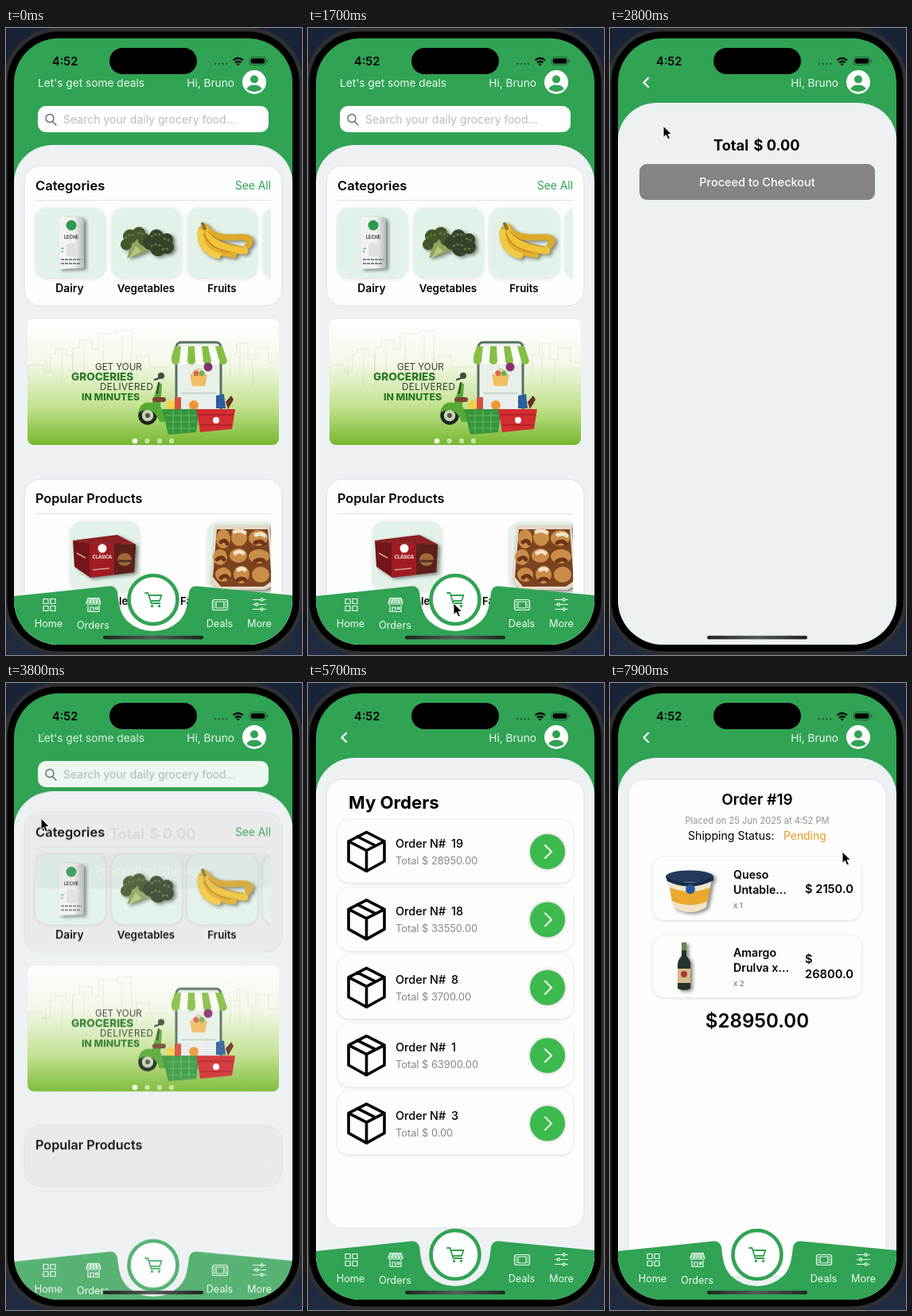
Recreate the animation shown at these times as an HTML page. Size 372 by 788 pixels, loop 8 s.

```html
<!DOCTYPE html>
<html lang="en">
<head>
<meta charset="utf-8">
<title>Grocery app</title>
<style>
html, body { margin: 0; width: 100%; height: 100%; overflow: hidden; background: #1b2438; }
svg { display: block; width: 372px; height: 788px; font-family: Inter, Roboto, sans-serif; }
text { white-space: pre; }
.mid { text-anchor: middle; }
.end { text-anchor: end; }
.w5 { font-weight: 500; }
.w6 { font-weight: 600; }
.w7 { font-weight: 700; }
.w8 { font-weight: 800; }
.line { fill: none; stroke-linecap: round; stroke-linejoin: round; }
.card { fill: #fdfdfd; stroke: #dadfe2; }
.tile { fill: #e2f2e9; filter: drop-shadow(0 1px 2px #0002); }
.row { fill: #fdfdfd; filter: drop-shadow(0 1px 2px #0002); }
.photo { filter: drop-shadow(3px 2px 2px #0007); }
.label { font-size: 12.7px; fill: #eefaf1; text-anchor: middle; }

.move { animation: 8s ease-in-out infinite; }
.panel { animation-name: panel; }
.home { animation-name: home; }
.home .card { animation: tint 8s ease-in-out infinite; }
.cart { animation-name: cart; }
.orders { animation-name: orders; }
.detail { animation-name: detail; }
.back { animation-name: back; }
.nav { animation-name: nav; }
.loaded { animation: loaded 8s step-end infinite; }
.home .loading { animation: loading 8s step-end infinite, tint 8s ease-in-out infinite; }
.press-cart { animation: pressCart 8s linear infinite; }
.press-orders { animation: pressOrders 8s linear infinite; }
.pointer { animation: point 8s ease-in-out infinite, seen 8s step-end infinite; }

@keyframes panel {
  0%, 23.125% { transform: none; }
  27.5%, 44.5% { transform: translateY(-53px); }
  48.875%, 63.5% { transform: none; }
  67.875%, 100% { transform: translateY(-53px); }
}
@keyframes home {
  0%, 23.125% { opacity: 1; }
  27.5%, 44.5% { opacity: 0; }
  48.3%, 63.5% { opacity: 1; }
  67.875%, 100% { opacity: 0; }
}
@keyframes tint {
  0%, 23.125% { fill: #fdfdfd; }
  27.5%, 44.5% { fill: #a0a0a0; }
  48.875%, 63.5% { fill: #fdfdfd; }
  67.875%, 100% { fill: #a0a0a0; }
}
@keyframes cart {
  0%, 23.125% { opacity: 0; }
  27.5%, 44.5% { opacity: 1; }
  48.2%, 100% { opacity: 0; }
}
@keyframes orders {
  0%, 63.5% { opacity: 0; }
  67.875%, 83.75% { opacity: 1; }
  88.125%, 100% { opacity: 0; }
}
@keyframes detail {
  0%, 83.75% { opacity: 0; }
  88.125%, 100% { opacity: 1; }
}
@keyframes back {
  0%, 23.125% { opacity: 0; }
  27.5%, 44.5% { opacity: 1; }
  48.875%, 63.5% { opacity: 0; }
  67.875%, 100% { opacity: 1; }
}
@keyframes nav {
  0%, 23.125% { transform: none; opacity: 1; }
  27.5%, 44.5% { transform: translateY(65px); opacity: 0; }
  48.875%, 100% { transform: none; opacity: 1; }
}
@keyframes loaded { 0% { opacity: 1; } 44.5% { opacity: 0; } 50.6%, 100% { opacity: 1; } }
@keyframes loading { 0% { opacity: 0; } 44.5% { opacity: 1; } 50.6%, 100% { opacity: 0; } }
@keyframes pressCart { 0%, 22% { opacity: 1; } 22.5%, 23.5% { opacity: .3; } 25%, 100% { opacity: 1; } }
@keyframes pressOrders { 0%, 61.2% { opacity: 1; } 61.8%, 63.5% { opacity: .25; } 66%, 100% { opacity: 1; } }
@keyframes point {
  0%, 17.5% { transform: translate(205px, 650px); }
  20%, 26% { transform: translate(183px, 723px); }
  35% { transform: translate(67px, 123px); }
  40%, 44.3% { transform: translate(45px, 70px); }
  47.5% { transform: translate(44px, 170px); }
  56%, 66% { transform: translate(118px, 732px); }
  77.5% { transform: translate(250px, 400px); }
  81.5%, 85% { transform: translate(300px, 214px); }
  92%, 100% { transform: translate(292px, 212px); }
}
@keyframes seen {
  0% { opacity: 0; }
  17.5% { opacity: 1; }
  66% { opacity: 0; }
  77.5%, 100% { opacity: 1; }
}
</style>
</head>
<body>
<svg viewBox="0 0 372 788">
  <defs>
    <clipPath id="screen"><rect x="10" y="13" width="350" height="762" rx="56"/></clipPath>
    <clipPath id="inner"><rect x="30" y="215" width="303" height="560"/></clipPath>
    <clipPath id="ad"><rect x="27" y="366" width="316" height="158" rx="8"/></clipPath>
    <linearGradient id="desk" x2="0" y2="1">
      <stop offset="0" stop-color="#1a2439"/><stop offset=".5" stop-color="#10151f"/><stop offset="1" stop-color="#202b42"/>
    </linearGradient>
    <linearGradient id="lawn" x2="0" y2="1">
      <stop offset="0" stop-color="#fff"/><stop offset=".35" stop-color="#f3f8e9"/>
      <stop offset=".7" stop-color="#c2e18d"/><stop offset="1" stop-color="#76b82e"/>
    </linearGradient>
    <linearGradient id="side"><stop offset=".6" stop-color="#f2f3f1"/><stop offset="1" stop-color="#b4b9b7"/></linearGradient>
    <linearGradient id="bar"><stop stop-color="#222"/><stop offset=".5" stop-color="#555c5a"/><stop offset="1" stop-color="#222"/></linearGradient>
    <g id="parcel" class="line" stroke="#000" stroke-width="3.6">
      <path d="M0-24.500 22.500-13V12L0 24.500-22.500 12V-13ZM-22.500-13 0-1.500 22.500-13M0-1.500V24.500M-11.500-19 11.500-7.500"/>
    </g>
  </defs>

  <rect width="372" height="788" fill="url(#desk)"/>
  <rect x="-1" y="2" width="372" height="784" rx="67" fill="#000" stroke="#2d2f32" stroke-width="5"/>

  <g clip-path="url(#screen)">
    <rect x="10" y="13" width="350" height="762" fill="#31a354"/>

    <g class="move panel">
      <rect x="10" y="147" width="350" height="760" rx="49" ry="47" fill="#edf1f4"/>

      <g class="move home">
        <rect class="card" x="23" y="173" width="324" height="176" rx="20"/>
        <text class="w6" x="37" y="204" font-size="16.500">Categories</text>
        <text class="end" x="333" y="203" font-size="13.800" fill="#31a354">See All</text>
        <path d="M37 216.500H333" stroke="#dfe2e4"/>
        <g clip-path="url(#inner)">
          <rect class="tile" x="37" y="226" width="88" height="88" rx="15"/>
          <rect class="tile" x="133" y="226" width="88" height="88" rx="15"/>
          <rect class="tile" x="228" y="226" width="88" height="88" rx="15"/>
          <rect class="tile" x="323" y="226" width="88" height="88" rx="15"/>
        </g>
        <g class="photo">
          <path d="M66 241 69 237 96 238 98 242V302L67 303Z" fill="url(#side)"/>
          <circle cx="82" cy="248" r="6.500" fill="#2c9a4d"/>
          <path d="M76 272q6-4 12 0v14q-6 3-12 0Z" fill="#dce1df"/>
          <path d="M69 277h4M69 281h3" stroke="#7fae8a" stroke-width="1.500"/>
          <path d="M69 291h26M69 296h24" stroke="#7d868c" stroke-width="1.800" stroke-dasharray="4 1"/>
          <text class="mid w7" x="82" y="265" font-size="5.500" fill="#333">LECHE</text>
        </g>
        <g class="photo">
          <path d="M152 289 158 271 172 264 181 279 164 286Z" fill="#91a45a"/>
          <path d="M155 289 163 274 170 281Z" fill="#b5c582"/>
          <g fill="#45562b">
            <circle cx="151" cy="272" r="7"/><circle cx="156" cy="262" r="9"/><circle cx="167" cy="258" r="8"/><circle cx="174" cy="266" r="8"/>
          </g>
          <g fill="#34432a">
            <circle cx="181" cy="270" r="9"/><circle cx="189" cy="262" r="9"/><circle cx="202" cy="266" r="8"/><circle cx="191" cy="277" r="10"/><circle cx="202" cy="275" r="9"/>
          </g>
          <path class="line" d="M150 264q6-6 12-3M166 258q6-1 8 4M183 262q8-6 12 0M199 265q6 0 7 5M183 274q8-5 13 2M197 278q5-2 7 1" stroke="#64783f" stroke-width="2.500" stroke-dasharray="1 4"/>
        </g>
        <g class="photo line">
          <path d="M251 250Q260 265 287 263T304 273" stroke="#dda92a" stroke-width="8"/>
          <path d="M249 251Q254 275 300 280" stroke="#f1c338" stroke-width="9"/>
          <path d="M246 253Q248 281 286 285" stroke="#e3ae2d" stroke-width="8"/>
          <path d="M244 257Q244 280 266 286" stroke="#f3ca45" stroke-width="8"/>
          <path d="M254 256Q266 271 298 275M249 259Q256 278 282 282" stroke="#b98521" stroke-width="1.200"/>
          <path d="M247 246l3 6" stroke="#8a7430" stroke-width="4"/>
        </g>
        <g class="mid w6" font-size="13.300">
          <text x="80" y="332" font-size="13.800">Dairy</text><text x="176" y="332">Vegetables</text><text x="271.500" y="332">Fruits</text>
        </g>

        <g clip-path="url(#ad)">
          <rect x="27" y="366" width="316" height="158" fill="url(#lawn)"/>
          <path class="line" d="M28 440V424H46V432H56V410H62V404H76V412H84V450M84 430V402H92V392H108V404H116V384H140V380H158V450M122 390V445M146 386V445M164 440V412H180V426H204M282 440V410H290V396H304V416H314V402H330V420H342M50 440V416M70 410V450M98 398V440M294 402V450M310 418V450" stroke="#94a39a" opacity=".2"/>
          <g fill="#333c33" font-size="11.600">
            <text x="112" y="430">GET YOUR</text>
            <text x="118" y="455" letter-spacing=".5">DELIVERED</text>
          </g>
          <g class="w8" fill="#287a22">
            <text x="82" y="443" font-size="13.600">GROCERIES</text>
            <text x="95" y="468" font-size="12.300">IN MINUTES</text>
          </g>
          <rect x="214" y="395" width="56" height="94" rx="6" fill="#e9f0ea" stroke="#587064" stroke-width="3"/>
          <path d="M212 400H272L278 413V418a5 5 0 0 1-10 0a5 5 0 0 1-10 0a5 5 0 0 1-10 0a5 5 0 0 1-10 0a5 5 0 0 1-10 0a5 5 0 0 1-10 0a5 5 0 0 1-10 0V413Z" fill="#fbfcf5"/>
          <path d="M212 400h8l-2 18a5 5 0 0 1-10 0v-5ZM229 400h8l1 18a5 5 0 0 1-10 0ZM246 400h8l4 18a5 5 0 0 1-10 0ZM263 400h9l6 18a5 5 0 0 1-10 0Z" fill="#86bf45"/>
          <circle cx="254" cy="426" r="5.500" fill="#86316d"/>
          <path d="M231 436h22l-3 14h-16Z" fill="#f0bd61"/>
          <path class="line" d="M233 436q9-15 18 0" stroke="#d8a14e"/>
          <circle cx="239" cy="434" r="3.500" fill="#e2644d"/><circle cx="246" cy="434" r="3.500" fill="#74b34e"/>
          <path class="line" d="M221 459h42" stroke="#c7d4ca" stroke-width="2"/>
          <circle cx="178" cy="487" r="9.500" fill="#c7d3b5" stroke="#20271e" stroke-width="4.500"/>
          <circle cx="178" cy="487" r="3" fill="#4b5547"/>
          <path d="M166 484Q169 468 184 471L191 446 196 447 194 475Q199 490 213 482L216 495H193Q184 472 166 484Z" fill="#55a934"/>
          <path class="line" d="M187 442l11-4M192 446l-2 13" stroke="#33402f" stroke-width="2"/>
          <circle cx="195" cy="437" r="4" fill="#424c3f"/>
          <rect x="184" y="464" width="17" height="6" rx="3" fill="#79462d"/>
          <circle cx="207" cy="474" r="6" fill="#f2d14b"/><rect x="212" y="464" width="8" height="18" fill="#d84e40"/>
          <rect x="222" y="467" width="9" height="16" fill="#e7e9eb"/><circle cx="236" cy="474" r="6" fill="#ef9735"/>
          <path d="M248 466l8-4 6 18h-12Z" fill="#e9edf0"/><path d="M264 462l10-2 2 18h-12Z" fill="#2f5e9e"/><path d="M276 470l7-8 3 5-7 12Z" fill="#6e2d26"/>
          <path d="M196 479H243L239 508 204 511Z" fill="#36963d"/>
          <path d="M201 487h38M203 495h35M204 503h34M210 481v28M220 481v27M230 481v27" stroke="#62b95c" stroke-width="1.200"/>
          <path d="M239 479H288L284 504 244 508Z" fill="#d32d31"/>
          <path d="M242 486h44M244 499h40" stroke="#a91f26" stroke-width="1.500"/>
          <circle cx="264" cy="493" r="4" fill="#fff"/>
          <g fill="#fff"><circle cx="162" cy="519" r="3.300"/><g opacity=".55"><circle cx="177.500" cy="519" r="3.200"/><circle cx="193" cy="519" r="3.200"/><circle cx="208" cy="519" r="3.200"/></g></g>
        </g>

        <rect class="card loading" x="23" y="567" width="324" height="76" rx="20"/>
        <g class="loaded">
          <rect class="card" x="23" y="567" width="324" height="240" rx="20"/>
          <g clip-path="url(#inner)">
            <rect class="tile" x="81" y="620" width="87" height="87" rx="15"/>
            <rect class="tile" x="253" y="620" width="87" height="87" rx="15"/>
            <g class="photo">
              <path d="M84 644 140 637 163 649 105 647Z" fill="#8e2024"/>
              <path d="M84 644 105 647V690L86 677Z" fill="#74151a"/>
              <path d="M105 647 163 649 161 684 105 691Z" fill="#a01c22"/>
              <path d="M136 648 163 649 161 684 136 687Z" fill="#5c201b"/>
              <circle cx="121" cy="654" r="5.500" fill="#fff"/>
              <text class="mid w7" x="121" y="667" font-size="5.500" fill="#fff">CLÁSICA</text>
              <ellipse cx="149" cy="668" rx="9" ry="8" fill="#a2683a"/>
              <path d="M141 670h17" stroke="#55331d" stroke-width="3"/>
              <path d="M109 681 130 679M89 660l11 6" stroke="#d6a293" stroke-width="1.500"/>
            </g>
            <g class="photo">
              <path d="M262 625H331L338 700 326 706H268L256 694Z" fill="#e4d8c8"/>
              <path d="M265 630H329L334 695 324 702H270L260 690Z" fill="#7b431f"/>
              <g fill="#c98d48">
                <ellipse cx="273" cy="642" rx="9" ry="12"/><ellipse cx="293" cy="640" rx="10" ry="11"/><ellipse cx="317" cy="641" rx="12" ry="10"/>
                <ellipse cx="269" cy="665" rx="9" ry="10"/><ellipse cx="292" cy="663" rx="11" ry="9"/><ellipse cx="318" cy="664" rx="13" ry="9"/>
                <ellipse cx="273" cy="687" rx="10" ry="9"/><ellipse cx="296" cy="687" rx="10" ry="11"/><ellipse cx="320" cy="687" rx="11" ry="10"/>
              </g>
              <path class="line" d="M270 646q6-4 8 2M313 647q7-4 11 1M265 668q6-5 9 0M313 670q8-4 11 0M270 691q6-5 9 0M291 694q6-4 10 0" stroke="#6d3515" stroke-width="5"/>
              <path class="line" d="M287 633q7-3 13 1M288 660q5-4 10 0M314 637q7-3 11 1M292 681q5-3 8 0" stroke="#f3e4cb" stroke-width="5"/>
            </g>
          </g>
          <g class="w6" font-size="13.200"><text x="142" y="725">le</text><text x="219" y="725">Fa</text></g>
        </g>
        <text class="w6" x="37" y="597" font-size="16.200">Popular Products</text>
        <path d="M37 610.500H333" stroke="#dfe2e4"/>
      </g>

      <g transform="translate(0 53)">
        <g class="move cart">
          <g class="w7" font-size="18.200"><text x="130" y="154">Total</text><text x="180.500" y="154">$ 0.00</text></g>
          <rect x="37" y="171" width="296" height="45" rx="9" fill="#848387"/>
          <text class="mid w5" x="185" y="199" font-size="14.500" fill="#fff">Proceed to Checkout</text>
        </g>
        <g class="move orders">
          <rect class="card" x="23" y="121" width="324" height="564" rx="20"/>
          <text class="w7" x="51" y="158" font-size="22.200">My Orders</text>
          <g id="list"></g>
        </g>
        <g class="move detail">
          <rect class="card" x="23" y="121" width="324" height="625" rx="20"/>
          <text class="mid w6" x="185" y="153" font-size="19">Order #19</text>
          <text class="mid" x="185" y="177" font-size="11.100" fill="#929296">Placed on 25 Jun 2025 at 4:52 PM</text>
          <text x="98" y="197" font-size="14.100">Shipping Status:</text>
          <text x="218" y="197" font-size="13.900" fill="#ee9723">Pending</text>
          <rect class="row" x="54" y="219" width="262" height="79" rx="15"/>
          <rect class="row" x="54" y="317" width="262" height="78" rx="15"/>
          <g class="photo">
            <path d="M73 246H128L121 282Q101 294 80 282Z" fill="#f1e5c7"/>
            <path d="M75 257Q101 267 126 257L123 274Q101 284 78 274Z" fill="#e9a92f"/>
            <ellipse cx="100" cy="243" rx="30" ry="7.500" fill="#23395e"/>
            <path d="M70 243Q101 259 130 243V248Q101 263 72 249Z" fill="#182b4b"/>
            <circle cx="101" cy="259" r="6" fill="#2759a5"/>
          </g>
          <g class="photo">
            <path d="M90 328H96V343Q102 349 101 355V384Q93 388 85 384V355Q85 348 90 343Z" fill="#263329"/>
            <path d="M90 326h6v10h-6Z" fill="#62874b"/>
            <path d="M85 359h16v18H85Z" fill="#d6bb8a"/>
            <circle cx="93" cy="366" r="4" fill="#ad3430"/>
          </g>
          <g class="w6" font-size="14.200">
            <text x="155" y="246">Queso</text><text x="155" y="265">Untable...</text>
            <text x="155" y="344">Amargo</text><text x="155" y="363">Drulva x...</text>
          </g>
          <g class="w6" font-size="14.700">
            <text x="245" y="264">$ 2150.0</text><text x="245" y="352">$</text><text x="245" y="371">26800.0</text>
          </g>
          <g class="w6" font-size="9.500" fill="#8c8c90"><text x="155" y="283">x 1</text><text x="155" y="381">x 2</text></g>
          <text class="mid w6" x="185" y="433" font-size="24.100">$28950.00</text>
        </g>
      </g>
    </g>

    <g class="move home">
      <text x="40" y="74" font-size="13.700" fill="#e9f8ee">Let's get some deals</text>
      <rect x="40" y="98" width="290" height="33" rx="10" fill="#fff"/>
      <path class="line" d="M59 118 63 122M60 113.500a5 5 0 1 1-10 0a5 5 0 1 1 10 0" stroke="#606064" stroke-width="1.300"/>
      <text x="72" y="120" font-size="14" fill="#bcbcc0">Search your daily grocery food...</text>
    </g>
    <path class="move back line" d="M48 63 42.500 68.500 48 74" stroke="#fff" stroke-width="2.300"/>
    <text class="end" x="287" y="74" font-size="13.700" fill="#e9f8ee">Hi, Bruno</text>
    <circle cx="312" cy="68" r="15" fill="#fff"/>
    <circle cx="312" cy="64.500" r="5" fill="#31a354"/>
    <path d="M302.500 77Q304 71.500 312 71.500T321.500 77Q312 83.500 302.500 77Z" fill="#31a354"/>

    <text class="w6" x="58" y="47" font-size="14.600">4:52</text>
    <rect x="130" y="25" width="110" height="33" rx="16.500"/>
    <g fill="#1c5e31"><circle cx="263" cy="45" r="1.200"/><circle cx="267.700" cy="45" r="1.200"/><circle cx="272.400" cy="45" r="1.200"/><circle cx="277" cy="45" r="1.200"/></g>
    <path d="M285.500 40.500q6-5 12.500 0M288 43.500q4-3 7.500 0" fill="none" stroke="#000" stroke-width="2.200"/>
    <path d="M289.700 45.200q2-1.400 4 0l-2 2.200Z"/>
    <rect x="306" y="36.500" width="21" height="10" rx="3.300" fill="none" stroke="#1d6635"/>
    <rect x="307.700" y="38.200" width="17.600" height="6.600" rx="2"/>
    <path d="M328.700 40v3" stroke="#1d6635" stroke-width="1.300"/>

    <g class="move nav">
      <path d="M10 714 130 701.500Q138 700.500 140 709C142 725 143 735 152 745Q166 758 185 758T218 745C227 735 228 725 230 709Q232 700.500 240 701.500L360 713V850H10Z" fill="#31a354"/>
      <circle cx="185" cy="718.500" r="30.500" fill="#fff" stroke="#31a354" stroke-width="4.600"/>
      <g class="press-cart">
        <path class="line" d="M175 710h3.500l4 13H193.500M179.500 713H195.500L193 720H182" stroke="#31a354" stroke-width="1.800"/>
        <circle cx="183.500" cy="726.500" r="1.700" fill="#31a354"/><circle cx="192.500" cy="726.500" r="1.700" fill="#31a354"/>
      </g>
      <g class="line" stroke="#eefaf1" stroke-width="1.200">
        <path d="M47 717.500h6v6h-6ZM56 717.500h6v6h-6ZM47 726.500h6v6h-6ZM56 726.500h6v6h-6Z"/>
        <rect x="259.500" y="718.500" width="19" height="13" rx="2.500"/><rect x="264" y="721" width="10" height="8"/>
        <path d="M261.700 721v8M276.300 721v8" stroke-dasharray="1 2.300"/>
        <path d="M310.500 718.500h16M310.500 724.500h16M310.500 730.500h16"/>
        <g fill="#31a354"><circle cx="321.500" cy="718.500" r="1.600"/><circle cx="315" cy="724.500" r="1.600"/><circle cx="321.500" cy="730.500" r="1.600"/></g>
      </g>
      <g class="press-orders">
        <path d="M103 716h14l2 7h-18Z" fill="#eefaf1" opacity=".5"/>
        <path class="line" d="M103 716.500h14l2 6.500q-2.300 3-4.600 0q-2.300 3-4.500 0q-2.300 3-4.500 0q-2.300 3-4.500 0ZM103 726v7.500h14V726M106 733v-5h4v5M112.500 728h2.500v2.500h-2.500ZM107 717l-1.500 5.500M110 717v5.500M113 717l1.500 5.500" stroke="#eefaf1" stroke-width="1.200"/>
        <text class="label" x="109.500" y="754.500">Orders</text>
      </g>
      <text class="label" x="53.500" y="753">Home</text>
      <text class="label" x="268.500" y="753">Deals</text>
      <text class="label" x="318.500" y="752.500">More</text>
    </g>
    <rect x="122" y="763.800" width="126" height="4.400" rx="2.200" fill="url(#bar)"/>
  </g>

  <g class="pointer">
    <path d="M0 0V14.500L3.300 11.400 5.800 17 8.400 15.900 6 10.500H10.500Z" fill="#000" stroke="#fff" stroke-width="1" stroke-linejoin="round"/>
  </g>
</svg>
<script>
const orders = [[19, "28950.00"], [18, "33550.00"], [8, "3700.00"], [1, "63900.00"], [3, "0.00"]];
const pitch = 85.4;

document.getElementById("list").innerHTML = orders.map(([id, total], i) => `
  <g transform="translate(0 ${i * pitch})">
    <rect class="row" x="37" y="172" width="296" height="79" rx="15"/>
    <use href="#parcel" x="73.500" y="212"/>
    <g class="w5" font-size="14.400"><text x="110" y="207">Order N#</text><text x="180" y="207">${id}</text></g>
    <text x="110" y="228" font-size="12.800" fill="#88888c">Total $ ${total}</text>
    <circle cx="301" cy="212" r="22" fill="#3cba4d" style="filter:drop-shadow(0 0 2px #0004)"/>
    <path class="line" d="M298 204 306 212 298 220" stroke="#fff" stroke-width="2"/>
  </g>`).join("");
</script>
</body>
</html>
```
